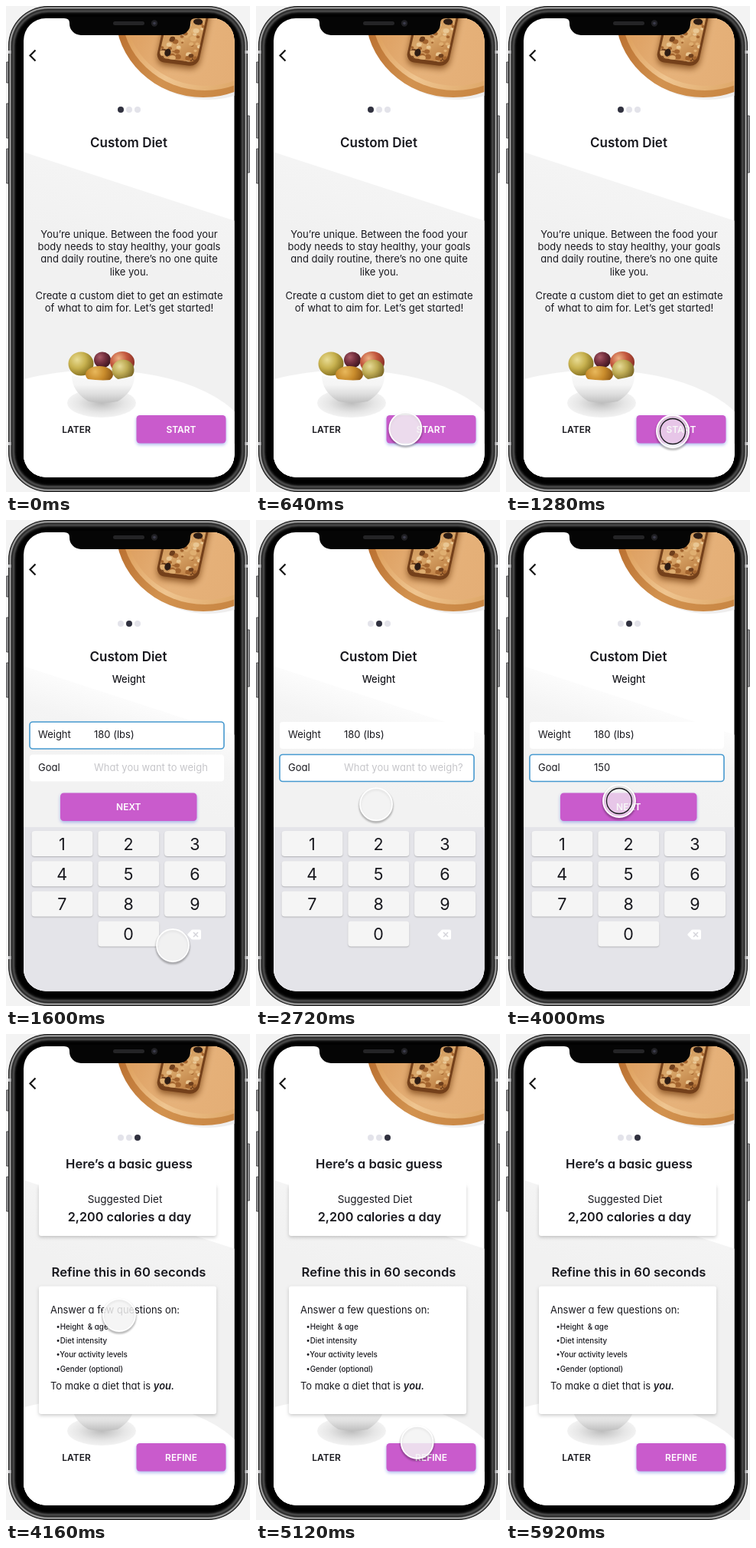
Animation, 319 px wide and 633 px high, one loop 7520 ms. Source, as an HTML page with a canvas:

```html
<!DOCTYPE html>
<html lang="en">
<head>
<meta charset="utf-8">
<title>Custom Diet</title>
<style>
  html, body { margin: 0; width: 100%; height: 100%; overflow: hidden; background: #f3f3f3; }
  canvas, svg { position: absolute; left: 0; top: 0; width: 319px; height: 633px; }
  svg { font-family: Inter, "Open Sans", sans-serif; font-feature-settings: "cv11"; }
  text { white-space: pre; }
</style>
</head>
<body>
<canvas id="art" width="319" height="633"></canvas>
<svg viewBox="0 0 319 633">
  <g id="labels"></g>
  <g id="touch">
    <circle cy="2" r="21" fill="none" stroke="#000" stroke-width="3" opacity=".3" style="filter:blur(1.3px)"/>
    <circle id="pad" r="21" fill="#f4f4f4" stroke="#fff" stroke-width="1.8"/>
    <circle id="ring" r="16.5" fill="none" stroke="#18181c" stroke-width="1.3"/>
  </g>
</svg>
<script>
const LOOP = 7520, STEP = 160, HOLD = 2 * STEP;
const INK = '#18181e', PINK = '#c95bcc', BLUE = '#4699cf';
const $ = id => document.getElementById(id);
const ctx = $('art').getContext('2d');

// ---------- helpers ----------
function box(x, y, w, h, r, fill, stroke, lw = 1) {
  ctx.beginPath();
  ctx.roundRect(x, y, w, h, r);
  if (fill) { ctx.fillStyle = fill; ctx.fill(); }
  if (stroke) { ctx.strokeStyle = stroke; ctx.lineWidth = lw; ctx.stroke(); }
}

function oval(x, y, rx, ry, fill) {
  ctx.beginPath();
  ctx.ellipse(x, y, rx, ry, 0, 0, Math.PI * 2);
  ctx.fillStyle = fill;
  ctx.fill();
}

function line(color, width, ...points) {
  ctx.beginPath();
  points.forEach(([x, y], i) => i ? ctx.lineTo(x, y) : ctx.moveTo(x, y));
  ctx.strokeStyle = color;
  ctx.lineWidth = width;
  ctx.stroke();
}

function scoped(draw) {
  ctx.save();
  draw();
  ctx.restore();
}

function shaded(color, blur, dy, draw) {
  scoped(() => {
    ctx.shadowColor = color;
    ctx.shadowBlur = blur;
    ctx.shadowOffsetY = dy;
    draw();
  });
}

function ramp(g, colors) {
  colors.forEach((c, i) => g.addColorStop(i / (colors.length - 1), c));
  return g;
}
const linear = (x0, y0, x1, y1, ...colors) => ramp(ctx.createLinearGradient(x0, y0, x1, y1), colors);
const radial = (x, y, r, ...colors) => ramp(ctx.createRadialGradient(x, y, 0, x, y, r), colors);

function seeded(seed) {
  return () => (seed = seed * 16807 % 2147483647) / 2147483647;
}

function label(str, x, y, size, { weight = 400, fill = INK, anchor = 'middle', tail } = {}) {
  const make = tag => document.createElementNS('http://www.w3.org/2000/svg', tag);
  const el = make('text');
  const attrs = { x, y, fill, 'font-size': size, 'font-weight': weight, 'text-anchor': anchor };
  for (const k in attrs) el.setAttribute(k, attrs[k]);
  el.textContent = str;
  if (tail) {
    const em = make('tspan');
    em.setAttribute('font-style', 'italic');
    em.setAttribute('font-weight', 600);
    em.textContent = tail;
    el.append(em);
  }
  $('labels').append(el);
}

const left = { anchor: 'start' };
const heading = (str, x, y, size = 16.6) => label(str, x, y, size, { weight: 600 });
const lines = (rows, x, y, gap, size, style) =>
  rows.forEach((s, i) => label(s, x, y + gap * i, size, style));

// ---------- phone ----------
function phone() {
  ctx.fillStyle = '#f3f3f3';
  ctx.fillRect(0, 0, 319, 633);
  const key = (x, y, h) => box(x, y, 4, h, 1.5, '#8e8e90', '#3c3c3e');
  key(0, 73, 27);
  key(0, 127, 45);
  key(0, 186, 45);
  key(315, 143, 74);
  // Metal rim: a bright edge, then a dim sheen fading into black.
  const bump = (d, at, width) => Math.exp(-(((d - at) / width) ** 2));
  for (let d = 0; d < 13; d += 0.5) {
    const v = 20 + 165 * bump(d, 2.2, 1.2) + 65 * bump(d, 6.5, 2) - 1.5 * d;
    box(3 + d, d, 313 - 2 * d, 633 - 2 * d, 52 - d, `rgb(${v},${v},${v})`);
  }
  ctx.fillStyle = '#c4c4c6';
  for (const x of [3, 312.5]) for (const y of [58, 568]) ctx.fillRect(x, y, 3.5, 4);
}

function notch() {
  ctx.beginPath();
  ctx.moveTo(76, 14);
  ctx.lineTo(76, 16);
  ctx.quadraticCurveTo(83, 16, 83, 22);
  ctx.arcTo(83, 38, 99, 38, 15);
  ctx.arcTo(241, 38, 241, 22, 15);
  ctx.lineTo(241, 22);
  ctx.quadraticCurveTo(241, 16, 248, 16);
  ctx.lineTo(248, 14);
  ctx.fillStyle = '#050505';
  ctx.fill();
  box(140, 20, 41, 5, 2.5, '#242426');
  oval(194, 22.5, 4.2, 4.2, '#202024');
  oval(194, 22.5, 1.8, 1.8, '#3c3c4c');
}

// ---------- pictures ----------
function plate() {
  oval(264, 13, 115, 109, '#efeeee');
  oval(258, 10, 115, 109, linear(145, 30, 290, 115, '#b96f30', '#d2924f', '#c98744'));
  oval(260, 7, 109, 103, linear(155, 30, 290, 110, '#dc9c58', '#efc590', '#e0aa6c'));
  oval(261, 5, 105, 99, linear(165, 20, 298, 90, '#dd9f60', '#e6b27a', '#e4ae76'));
  scoped(bread);
}

function bread() {
  const rnd = seeded(11);
  ctx.transform(1, 0.13, -0.22, 1, 196, 70);
  shaded('rgba(110,55,10,.75)', 9, 4, () => box(0, -80, 55, 82, 11, '#74401a'));
  box(3, -80, 49, 77, 9, linear(0, -60, 50, 0, '#c98c50', '#d8a568', '#b9783c'));
  ctx.clip();
  const tones = ['#e9c794', '#dfae70', '#a3642e', '#6f3f1c'];
  for (let i = 0; i < 90; i++) {
    const r = 0.8 + 2.6 * rnd();
    oval(52 * rnd(), -76 * rnd(), r * 1.3, r, tones[Math.floor(rnd() * tones.length)]);
  }
  oval(13, -11, 4, 5, '#2d1c13');
  oval(43, -55, 6, 4, '#2d1c13');
}

function backdrop(soft) {
  ctx.fillStyle = '#fff';
  ctx.fillRect(20, 14, 282, 602);
  ctx.beginPath();
  ctx.moveTo(22, 190);
  ctx.lineTo(300, 280);
  ctx.lineTo(300, 616);
  ctx.lineTo(22, 616);
  ctx.fillStyle = soft
    ? linear(160, 215, 120, 338, '#ffffff', '#f4f4f4', '#f2f2f2')
    : linear(160, 235, 135, 315, '#f4f4f4', '#f1f1f1');
  ctx.fill();
}

function table() {
  oval(120, 572, 200, 98, '#fff');
  ctx.fillStyle = '#fff';
  ctx.fillRect(20, 570, 282, 46);
  scoped(() => {
    ctx.translate(125, 517);
    ctx.scale(1, 0.42);
    oval(0, 0, 45, 45, radial(0, 0, 45, '#bcbcbc', '#d2d2d2', '#e6e6e6', '#f2f2f2'));
  });
}

function fruit(x, y, rx, ry, light, mid, dark) {
  oval(x, y, rx, ry, radial(x - rx * 0.3, y - ry * 0.35, rx * 1.35, light, mid, dark));
}

function bowl() {
  fruit(126, 461, 11, 10.5, '#a85a66', '#74303f', '#3f1722');
  fruit(152, 464, 16, 14, '#eeb283', '#c4593f', '#8a2f26');
  fruit(98, 466, 16.5, 15.5, '#e8dc94', '#c8b250', '#86701f');
  fruit(122, 480, 18, 11, '#e8b85c', '#c98c2c', '#8a5514');
  fruit(153, 474, 14.5, 13.5, '#e6da98', '#bfac55', '#7d6a28');
  ctx.beginPath();
  ctx.moveTo(86, 481);
  ctx.quadraticCurveTo(127, 494, 168, 481);
  ctx.bezierCurveTo(168, 500, 154, 510, 146, 515);
  ctx.quadraticCurveTo(127, 519, 108, 515);
  ctx.bezierCurveTo(98, 509, 86, 499, 86, 481);
  ctx.fillStyle = linear(0, 482, 0, 517, '#f8f8f8', '#f4f4f4', '#dedede', '#bebebe');
  ctx.fill();
}

// ---------- controls ----------
function chrome(active) {
  line('#151515', 2.2, [38.5, 57.5], [31.5, 64.5], [38.5, 71.5]);
  for (let i = 0; i < 3; i++) oval(150 + 11 * i, 135, 4, 4, i === active ? '#30313f' : '#e3e3ea');
}

function button(str, x, y, w, h) {
  shaded('rgba(90,110,220,.5)', 4, 2, () => box(x, y, w, h, 4.5, PINK));
  label(str, x + w / 2, y + h / 2 + 4.4, 12, { weight: 600, fill: '#fff' });
}

function card(x, y, w, h) {
  shaded('rgba(0,0,0,.2)', 4, 2, () => box(x, y, w, h, 3, '#fff'));
}

function field(name, value, y, on, color = INK) {
  box(31, y, 254, 35, 4, '#fff', on && BLUE, 1.6);
  label(name, 42, y + 21.3, 13, left);
  label(value, 115, y + 21.3, 13, { ...left, fill: color });
}

function keypad() {
  ctx.fillStyle = '#e4e4e9';
  ctx.fillRect(20, 400, 282, 216);
  for (let i = 0; i < 10; i++) {
    const x = 33.5 + 86.8 * (i < 9 ? i % 3 : 1), y = 405 + 39.2 * Math.floor(i / 3);
    shaded('rgba(0,0,0,.22)', 1.5, 1, () => box(x, y, 80, 33, 4, '#f5f5f5'));
    label((i + 1) % 10, x + 39.8, y + 24.5, 21.5);
  }
  scoped(() => {
    ctx.translate(248, 540);
    ctx.rotate(Math.PI / 4);
    box(-8, -1, 9, 9, 1.5, '#fff');
  });
  box(242, 533.5, 13, 13, 2, '#fff');
  line('#d4d4da', 1.4, [245, 537], [251, 543]);
  line('#d4d4da', 1.4, [251, 537], [245, 543]);
}

function footer(action) {
  label('LATER', 92, 555.8, 12, { weight: 600 });
  button(action, 170.5, 533, 117, 36.5);
}

// ---------- screens ----------
function intro() {
  backdrop(false);
  table();
  bowl();
  plate();
  chrome(0);
  heading('Custom Diet', 160.5, 184, 17);
  lines(['You’re unique. Between the food your', 'body needs to stay healthy, your goals',
    'and daily routine, there’s no one quite', 'like you.'], 161, 302, 16.2, 13);
  lines(['Create a custom diet to get an estimate',
    'of what to aim for. Let’s get started!'], 161, 381.5, 16.2, 13.1);
  footer('START');
}

function form({ onGoal, goal, hint, next }) {
  backdrop(true);
  plate();
  chrome(1);
  heading('Custom Diet', 160, 184, 17);
  label('Weight', 160.5, 212, 13, { weight: 500 });
  field('Weight', '180 (lbs)', 263, !onGoal);
  field('Goal', goal || hint, 305.5, onGoal, goal ? INK : '#c6c6ca');
  if (next) button('NEXT', 71, 355.5, 178.5, 36.5);
  keypad();
}

function guess() {
  backdrop(false);
  table();
  bowl();
  plate();
  chrome(2);
  card(43, 196, 232, 67);
  ctx.fillStyle = '#fff';
  ctx.fillRect(43, 190, 232, 10);
  card(43, 328.5, 232, 166.5);
  heading('Here’s a basic guess', 161, 175);
  label('Suggested Diet', 155.5, 220, 13.5);
  heading('2,200 calories a day', 161.5, 244.3, 16.2);
  heading('Refine this in 60 seconds', 160.5, 316);
  label('Answer a few questions on:', 58, 364, 12.9, left);
  lines(['•Height  & age', '•Diet intensity', '•Your activity levels', '•Gender (optional)'],
    65.5, 384.5, 18.4, 9.8, { ...left, weight: 500 });
  label('To make a diet that is ', 58, 463.3, 12.9, { ...left, tail: 'you.' });
  footer('REFINE');
}

const screens = [
  { from: 0, draw: intro },
  { from: 1440, draw: () => form({ hint: 'What you want to weigh', next: true }) },
  { from: 2560, draw: () => form({ onGoal: true, hint: 'What you want to weigh?' }) },
  { from: 3360, draw: () => form({ onGoal: true, goal: '150', next: true }) },
  { from: 4160, draw: guess }
];

let shown = null;
function show(screen) {
  if (screen === shown) return;
  shown = screen;
  $('labels').replaceChildren();
  phone();
  scoped(() => {
    ctx.beginPath();
    ctx.roundRect(23, 16, 275.5, 597.5, 29);
    ctx.clip();
    screen.draw();
  });
  notch();
}

// ---------- touch ----------
const stops = [
  { at: 0, until: 0, x: 0, y: 520 },
  { at: 800, until: 1760, x: 218, y: 554 },
  { at: 2240, until: 2560, x: 163, y: 330 },
  { at: 3040, until: 3360, x: 140, y: 485 },
  { at: 3840, until: 4480, x: 148, y: 366 },
  { at: 5280, until: 5440, x: 218, y: 551 },
  { at: 5920, until: LOOP, x: 350, y: 545 }
];

function touchAt(t) {
  const i = stops.findIndex(s => t < s.until);
  const a = stops[i - 1], b = stops[i];
  const u = Math.min(1, (t - a.until) / (b.at - a.until));
  const e = u * u * (3 - 2 * u);
  return [a.x + (b.x - a.x) * e, a.y + (b.y - a.y) * e];
}

function moveTouch(t) {
  const visible = t >= STEP && t < 5920;
  $('touch').style.display = visible ? '' : 'none';
  if (!visible) return;
  // Each screen change follows a press that deepens over the hold.
  const next = screens.find(s => s.from > t);
  const press = next ? Math.max(0, (t - next.from + HOLD + STEP) / HOLD) : 0;
  $('touch').setAttribute('transform', `translate(${touchAt(t)})`);
  $('pad').setAttribute('fill-opacity', press > 0.4 ? 0.7 : 0.84);
  $('ring').setAttribute('opacity', press > 0.4 ? press : 0);
}

// ---------- playback ----------
const start = performance.now();
function frame() {
  const t = Math.floor(((performance.now() - start) % LOOP) / STEP) * STEP;
  show(screens.findLast(s => s.from <= t));
  moveTouch(t);
  requestAnimationFrame(frame);
}
frame();
</script>
</body>
</html>
```
